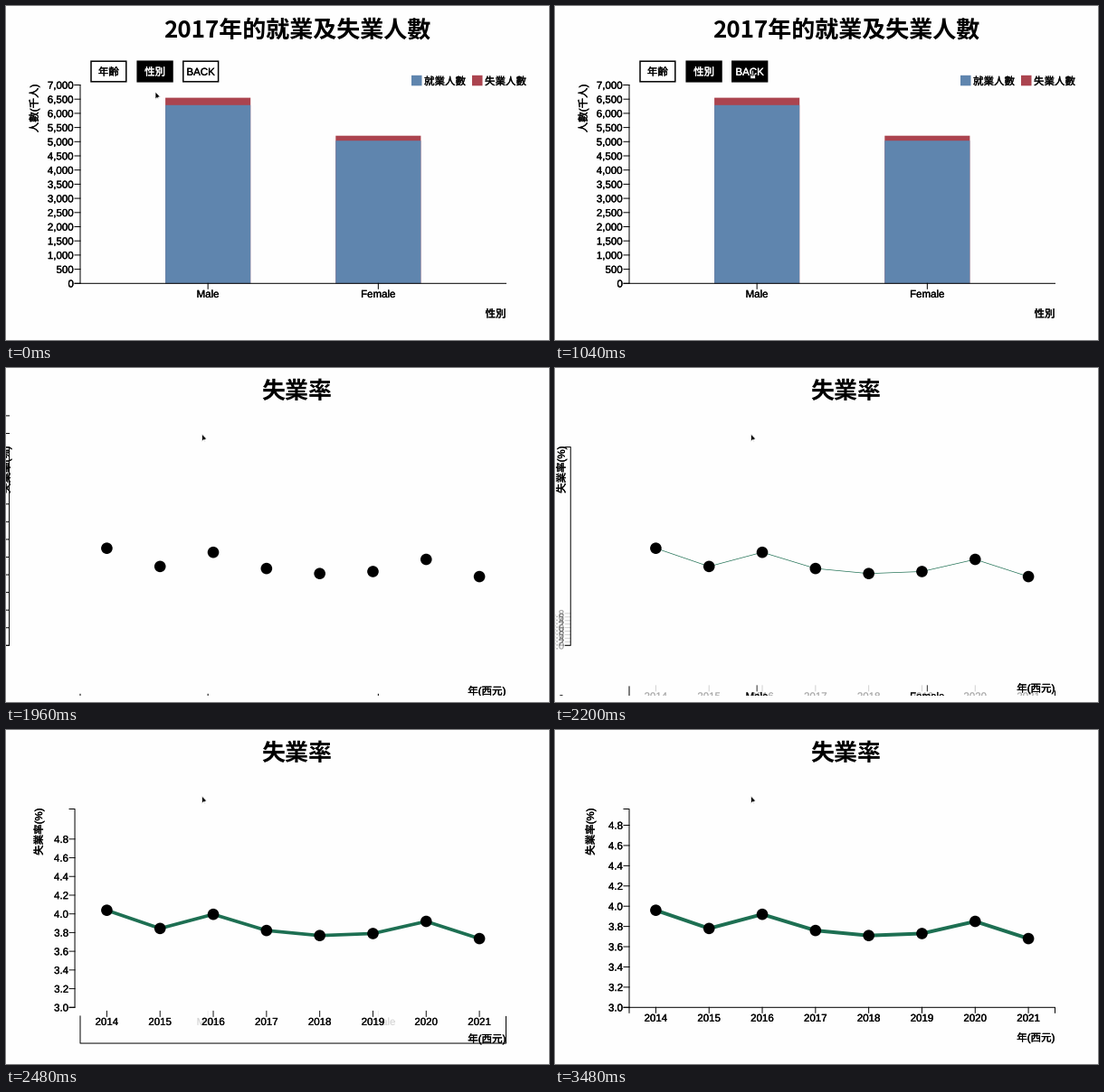
Recreate the animation shown at these times as a matplotlib script. Size 600x370 px, loop 3.6 s.

```python
import matplotlib.pyplot as plt
import numpy as np
from matplotlib.animation import FuncAnimation
from matplotlib.patches import Circle, Polygon, Rectangle
from matplotlib.patheffects import withStroke

W, H = 600, 370
FRAMES, STEP = 90, 40
PT = 0.72  # points per pixel at 100 dpi
SANS = ["Liberation Sans", "Noto Sans CJK JP"]
BLUE, RED, GREEN = "#5f85ae", "#ab444f", "#1d6f52"

LEFT, RIGHT, TOP, BASE = 82, 552.5, 87.5, 307.3
SPAN = RIGHT - LEFT
SWITCH, START, LENGTH = 1960, 1941, 735  # ms

RATES = [3.96, 3.78, 3.92, 3.76, 3.71, 3.73, 3.85, 3.68]
JOBS = {"Male": (6290, 6550), "Female": (5035, 5210)}  # employed, total
COUNT_TICKS = np.arange(0, 7001, 500)
RATE_TICKS = np.arange(3, 4.9, 0.2)

# pointer stops: time, x, y
STOPS = [(0, 165, 95), (320, 189, 79), (640, 230.5, 101),
         (1120, 217.5, 69), (1960, 216.5, 73)]
ARROW = np.array([(0, 0), (0, 8.5), (2, 6.4), (3.6, 9), (3.3, 6), (5.6, 5.8)])

fig = plt.figure(figsize=(W / 100, H / 100), dpi=100, facecolor="#fefefe")
ax = fig.add_axes([0, 0, 1, 1])
ax.set_xlim(0, W)
ax.set_ylim(H, 0)
ax.axis("off")
chart_area = Rectangle((0, 46), W, 317, transform=ax.transData)
live = []


def keep(artist, clip=True):
    artist.set_clip_on(clip)
    if clip:
        artist.set_clip_path(chart_area)
    artist.set_snap(False)
    live.append(artist)


def text(x, y, s, ha="center", color="black", **kw):
    bolder = withStroke(linewidth=0.3 * PT, foreground=color)
    keep(ax.text(x, y, s, fontsize=11.5 * PT, ha=ha, va="baseline",
                 family=SANS, color=color, path_effects=[bolder], **kw))


def title(s):
    keep(ax.text(321.5, 34, s, fontsize=26 * PT, ha="center", va="baseline",
                 family="Noto Sans CJK JP", weight="bold"), clip=False)


def side_label(x, s):
    text(x, TOP - 1, s, ha="right", rotation=90, rotation_mode="anchor")


def line(xs, ys, width=1, color="black", **kw):
    keep(ax.plot(xs, ys, color=color, lw=width * PT, **kw)[0])


def box(x, y, w, h, fill, edge="none", width=0, **kw):
    keep(ax.add_patch(Rectangle((x, y), w, h, fc=fill, ec=edge,
                                lw=width * PT, **kw)))


def y_axis(x):
    line([x - 6, x, x, x - 6], [TOP, TOP, BASE, BASE])


def y_tick(x, y, label, alpha=1):
    if 0 < y < H:
        line([x - 6, x], [y, y], alpha=alpha)
        text(x - 7, y + 4.2, label, ha="right", alpha=alpha)


def x_ticks(y, labels, alpha=1, inset=0):
    band = SPAN / (len(labels) + inset)
    for i, label in enumerate(labels):
        x = LEFT + band * (i + 0.5 + inset / 2)
        line([x, x], [y, y + 6], alpha=alpha)
        text(x, y + 15.5, label, alpha=alpha)


def button(x, label, active):
    fill, ink = ("black", "white") if active else ("white", "black")
    box(x, 61.2, 38.8, 22.6, fill, "black", 1.5)
    text(x + 19.4, 76.7, label, color=ink)


def pointer(x, y, hand):
    if hand:
        box(x - 2.5, y + 5, 5.5, 4.5, "white", "black", 0.7, zorder=5)
        box(x - 0.8, y, 1.6, 6, "white", "black", 0.7, zorder=5)
    else:
        keep(ax.add_patch(Polygon(ARROW + (x, y), fc="black", ec="white",
                                  lw=0.7 * PT, zorder=5)))


def pointer_at(ms):
    for (t0, *a), (t1, *b) in zip(STOPS, STOPS[1:]):
        if ms <= t1:
            k = (1 - np.cos(np.pi * (ms - t0) / (t1 - t0))) / 2
            return np.array(a) * (1 - k) + np.array(b) * k
    return np.array(STOPS[-1][1:])


def count_y(v):
    return BASE - (BASE - TOP) * v / 7000


def rate_y(v):
    return BASE - (v - 3) * 112.1


def ease(t):
    t = min(max(t, 0), 1)
    return 4 * t ** 3 if t < 0.5 else 1 - 4 * (1 - t) ** 3


def bar_page(x, y):
    title("2017年的就業及失業人數")
    hover = 195 < x < 235 and 61 < y < 84
    button(94, "年齡", False)
    button(145.2, "性別", True)
    button(195.8, "BACK", hover)

    for lx, color, label in ((448, BLUE, "就業人數"), (515, RED, "失業人數")):
        box(lx, 76.8, 11.5, 11.5, color)
        text(lx + 14, 87.2, label, ha="left")

    for i, (employed, total) in enumerate(JOBS.values()):
        bx = LEFT + SPAN * (0.2 + 0.4 * i)
        box(bx, count_y(total), SPAN / 5, BASE - count_y(total), RED)
        box(bx, count_y(employed), SPAN / 5, BASE - count_y(employed), BLUE)
    x_ticks(BASE, JOBS, inset=0.5)
    line([LEFT, RIGHT], [BASE, BASE])

    y_axis(LEFT)
    for v in COUNT_TICKS:
        y_tick(LEFT, count_y(v), f"{v:,}")
    side_label(35, "人數(千人)")
    text(RIGHT, 344.7, "性別", ha="right")
    pointer(x, y, hover)


def rate_page(ms, x, y):
    f = ease((ms - START) / LENGTH)
    rest = 1 - f
    title("失業率")

    ax_x = LEFT - 78.5 * rest
    y_axis(ax_x)
    for v in RATE_TICKS:
        y_tick(ax_x, count_y(v) * rest + rate_y(v) * f, f"{v:.1f}", f)
    # the old ticks shoot away on the new scale
    for v in COUNT_TICKS if rest else []:
        y_tick(ax_x, count_y(v) * rest + rate_y(v) * f, f"{v:,}", rest)
    side_label(43 - 39 * rest, "失業率(%)")

    # the baseline rises into place while its left end tick unfolds
    ax_y = BASE + 54 * rest
    floor = ax_y + 470 * rest
    line([LEFT, LEFT, RIGHT, RIGHT], [ax_y + 6 * f, floor, floor, ax_y + 6])
    x_ticks(ax_y, [str(2014 + i) for i in range(len(RATES))], f)
    if rest:
        x_ticks(ax_y, JOBS, rest, inset=0.5)
    text(RIGHT, 344.7 + 17 * rest, "年(西元)", ha="right")

    xs = LEFT + SPAN / len(RATES) * (np.arange(len(RATES)) + 0.5)
    ys = rate_y(np.array(RATES))
    if f > 0.001:
        line(xs, ys, 4 * f, GREEN, solid_joinstyle="miter")
    for point in zip(xs, ys):
        keep(ax.add_patch(Circle(point, 6.3, fc="black", ec="none", zorder=3)))
    pointer(x, y, False)


def draw(i):
    while live:
        live.pop().remove()
    ms = i * STEP
    x, y = pointer_at(ms)
    if ms < SWITCH:
        bar_page(x, y)
    else:
        rate_page(ms, x, y)
    return live


ax.plot([0, W], [369.5, 369.5], color="#c4c4c4", lw=PT)
anim = FuncAnimation(fig, draw, frames=FRAMES, interval=STEP,
                     init_func=lambda: draw(0), repeat=True, repeat_delay=0)
plt.show()
```
